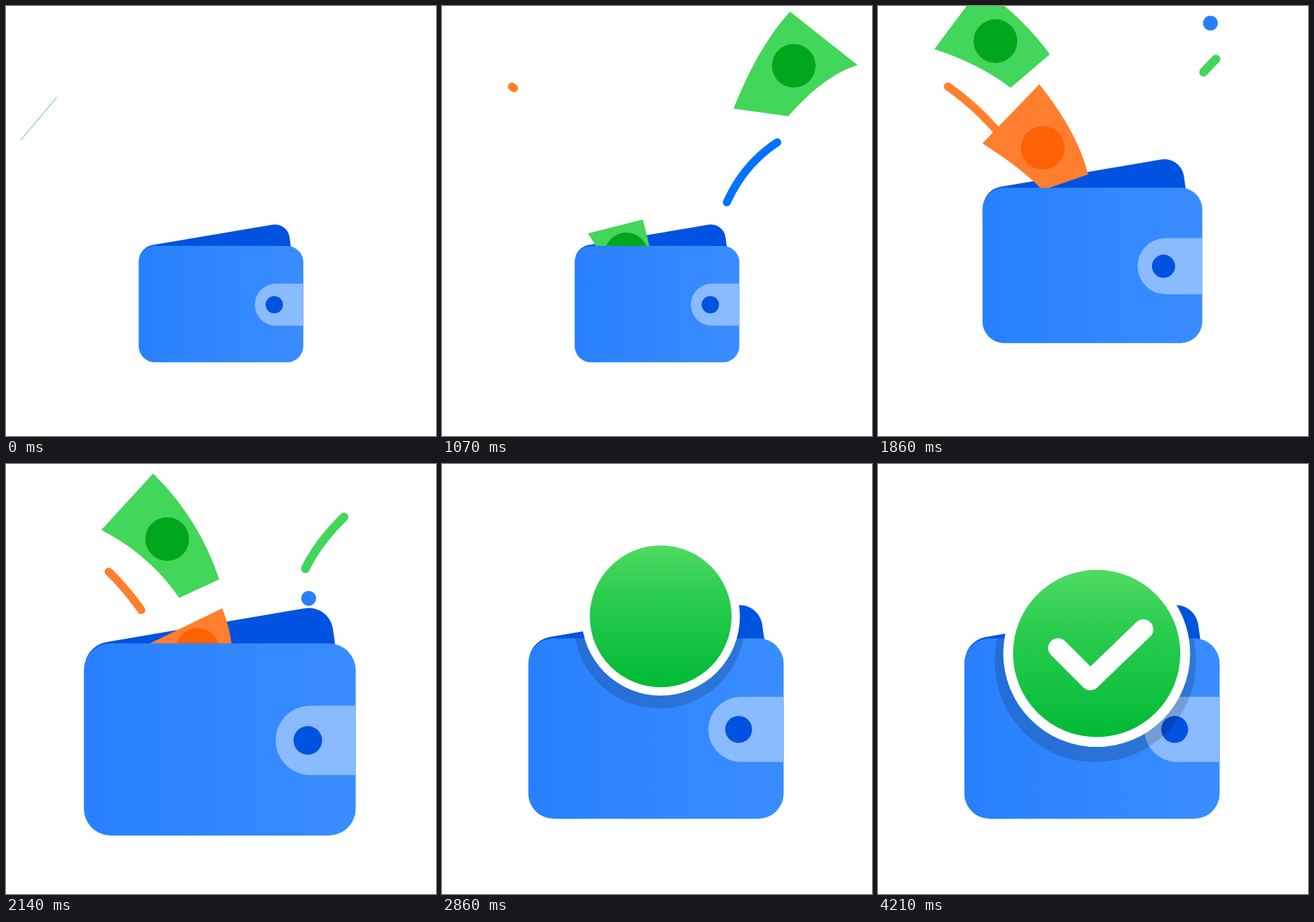
An HTML page with a canvas that plays this animation: 640 px wide and 640 px high, repeating every 5.57 s.

```html
<!DOCTYPE html>
<html lang="en">
<head>
<meta charset="utf-8">
<title>Wallet</title>
<style>
  html, body { margin: 0; width: 100%; height: 100%; overflow: hidden; background: #fff; }
  canvas { display: block; width: 640px; height: 640px; }
</style>
</head>
<body>
<canvas id="stage" width="640" height="640"></canvas>
<script>
const ctx = document.getElementById('stage').getContext('2d');
const LOOP = 5570, STEP = 1000 / 14, LAST_STEP = 59;

const GREEN = { paper: '#42d65a', spot: '#00a61b' };
const ORANGE = { paper: '#ff7f2e', spot: '#ff6105' };

// Each bill slides along a curve into the wallet; tilt turns from first to second angle.
const bills = [
  { path: [[48, 168], [220, 164], [290, 420]], start: -3, end: 1198, half: 42, tilt: [-50, 0], ...GREEN },
  { path: [[617, 29], [496, 44], [370, 390]], start: 430, end: 1864, half: 64, tilt: [46, -40], ...GREEN },
  { path: [[78, 65], [284, 209], [294, 313]], start: 1130, end: 2362, half: 61, tilt: [-58, 0], ...ORANGE },
  { path: [[75, 0], [300, 85], [327, 330]], start: 1403, end: 2840, half: 57, tilt: [-55, 0], ...GREEN }
];

const trails = [
  { path: [[499, 203], [450, 235], [424, 292]], grow: [480, 1000], shrink: [1100, 1550], color: '#0072ff', width: 12 },
  { path: [[104, 120], [176, 170], [222, 250]], grow: [1040, 2440], shrink: [1900, 2570], color: '#ff7f2e', width: 12 },
  { path: [[503, 79], [438, 143], [430, 208]], grow: [1760, 2400], shrink: [2390, 2720], color: '#42d65a', width: 13 }
];

// time, value...
const walletKeys = [[1210, 443.7, .645], [1857, 386.2, .861], [2150, 410, 1.065], [2500, 393.7, 1]];
const badgeKeys = [[2610, 0], [2857, 105.5], [3035, 128], [3430, 122.5], [3700, 124.5]];

const mix = (a, b, u) => a + (b - a) * u;
const ramp = (a, b, t) => Math.min(1, Math.max(0, (t - a) / (b - a)));
const smooth = (a, b, t) => { const u = ramp(a, b, t); return u * u * (3 - 2 * u); };
const pointOn = ([a, b, c], u) =>
  [0, 1].map(i => mix(mix(a[i], b[i], u), mix(b[i], c[i], u), u));

// Monotone cubic interpolation, so turning points stay where the keys put them
function track(keys, t) {
  const last = keys.length - 1;
  if (t <= keys[0][0]) return keys[0].slice(1);
  if (t >= keys[last][0]) return keys[last].slice(1);
  const i = keys.findIndex(k => k[0] > t) - 1;
  const slope = (n, c) => n < 0 || n >= last ? 0 :
    (keys[n + 1][c] - keys[n][c]) / (keys[n + 1][0] - keys[n][0]);
  const tangent = (n, c) => {
    const p = slope(n - 1, c), q = slope(n, c);
    return p * q > 0 ? 2 * p * q / (p + q) : 0;
  };
  const span = keys[i + 1][0] - keys[i][0], u = (t - keys[i][0]) / span;
  return keys[i].slice(1).map((v, n) => mix(v, keys[i + 1][n + 1], u * u * (3 - 2 * u)) +
    span * u * (1 - u) * ((1 - u) * tangent(i, n + 1) - u * tangent(i + 1, n + 1)));
}

function disc(x, y, r, fill) {
  ctx.beginPath();
  ctx.arc(x, y, Math.max(r, 0), 0, 2 * Math.PI);
  ctx.fillStyle = fill;
  ctx.fill();
}

function strokeRound(color, width) {
  ctx.strokeStyle = color;
  ctx.lineWidth = width;
  ctx.lineCap = ctx.lineJoin = 'round';
  ctx.stroke();
}

function drawBill({ path, start, end, half, tilt, paper, spot }, t) {
  if (t < start || t >= end) return;
  const q = ramp(start, end, t), tail = q * q, head = Math.min(1, 1.3 * q);
  const edge = (u, side) => {
    const [x, y] = pointOn(path, u);
    const angle = mix(tilt[0], tilt[1], u ** 1.5) * Math.PI / 180;
    const reach = side * (half - 60 * (u - tail));
    ctx.lineTo(x + reach * Math.cos(angle), y + reach * Math.sin(angle));
  };
  ctx.beginPath();
  for (let i = 0; i <= 16; i++) edge(mix(tail, head, i / 16), 1);
  for (let i = 16; i >= 0; i--) edge(mix(tail, head, i / 16), -1);
  ctx.fillStyle = paper;
  ctx.fill();
  disc(...pointOn(path, mix(tail, head, .48)), 32.5 * Math.min(1, 5 * (head - tail)), spot);
}

function drawTrail({ path, grow, shrink, color, width }, t) {
  const tail = ramp(...shrink, t), head = ramp(...grow, t);
  if (head <= tail) return;
  ctx.beginPath();
  for (let i = 0; i <= 24; i++) ctx.lineTo(...pointOn(path, mix(tail, head, i / 24)));
  strokeRound(color, width);
}

function drawDot(t) {
  const q = ramp(1720, 2290, t);
  if (q > 0 && q < 1) disc(500 - 90 * q * q, -14 + 335 * q ** 1.5, 11, '#2680ff');
}

function inWallet([y, scale], draw) {
  ctx.save();
  ctx.translate(320 - 1.5 * (scale - .645) / .355, y);
  ctx.scale(scale, scale);
  draw();
  ctx.restore();
}

function drawFlap() {
  ctx.beginPath();
  ctx.moveTo(-188, -90);
  ctx.arcTo(-195, -130, -158.5, -136.2, 37);
  ctx.arcTo(152.5, -189, 161.5, -134, 34);
  ctx.lineTo(163, -120);
  ctx.lineTo(150, -80);
  ctx.fillStyle = '#0052e1';
  ctx.fill();
}

function bodyPath() {
  ctx.beginPath();
  ctx.roundRect(-190, -134.25, 380, 268.5, 37.5);
}

function drawBody() {
  const blue = ctx.createLinearGradient(-190, 0, 190, 0);
  blue.addColorStop(0, '#2880ff');
  blue.addColorStop(1, '#3a8dff');
  bodyPath();
  ctx.fillStyle = blue;
  ctx.fill();
  ctx.beginPath();
  ctx.roundRect(78, -47.2, 112.3, 97, [48.5, 0, 0, 48.5]);
  ctx.fillStyle = '#8abaff';
  ctx.fill();
  disc(123, 1.3, 20, '#0052e1');
}

function drawTick(share) {
  if (share <= 0) return;
  const bend = .383, down = ramp(0, bend, share), up = ramp(bend, 1, share);
  ctx.beginPath();
  ctx.moveTo(-57.5, -8);
  ctx.lineTo(-57.5 + 48 * down, -8 + 48 * down);
  if (up > 0) ctx.lineTo(-9.5 + 79 * up, 40 - 76 * up);
  strokeRound('#fff', 29.5);
}

function drawBadge(wallet, t) {
  const [r] = track(badgeKeys, t);
  if (r <= 0) return;
  const x = 325.5, y = mix(226.5, 282, smooth(2800, 4080, t));
  ctx.save();
  inWallet(wallet, bodyPath);
  ctx.clip();
  disc(x - 2, y + r * .096, r * 1.204, 'rgba(0,0,0,.155)');
  ctx.restore();
  disc(x, y, r * 1.117, '#fff');
  const green = ctx.createLinearGradient(0, y - r, 0, y + r);
  green.addColorStop(0, '#4fdb62');
  green.addColorStop(.35, '#2bcd4f');
  green.addColorStop(1, '#00ba35');
  disc(x, y, r, green);
  ctx.save();
  ctx.translate(x, y);
  ctx.scale(r / 124.5, r / 124.5);
  drawTick(smooth(3340, 4000, t));
  ctx.restore();
}

function draw(t) {
  ctx.fillStyle = '#fff';
  ctx.fillRect(0, 0, 640, 640);
  const wallet = track(walletKeys, t);
  inWallet(wallet, drawFlap);
  trails.forEach(trail => drawTrail(trail, t));
  drawDot(t);
  bills.forEach(bill => drawBill(bill, t));
  inWallet(wallet, drawBody);
  drawBadge(wallet, t);
}

const began = performance.now();
function tick() {
  const t = (performance.now() - began) % LOOP;
  draw(Math.min(Math.floor((t + 4) / STEP), LAST_STEP) * STEP);
  requestAnimationFrame(tick);
}
tick();
</script>
</body>
</html>
```
